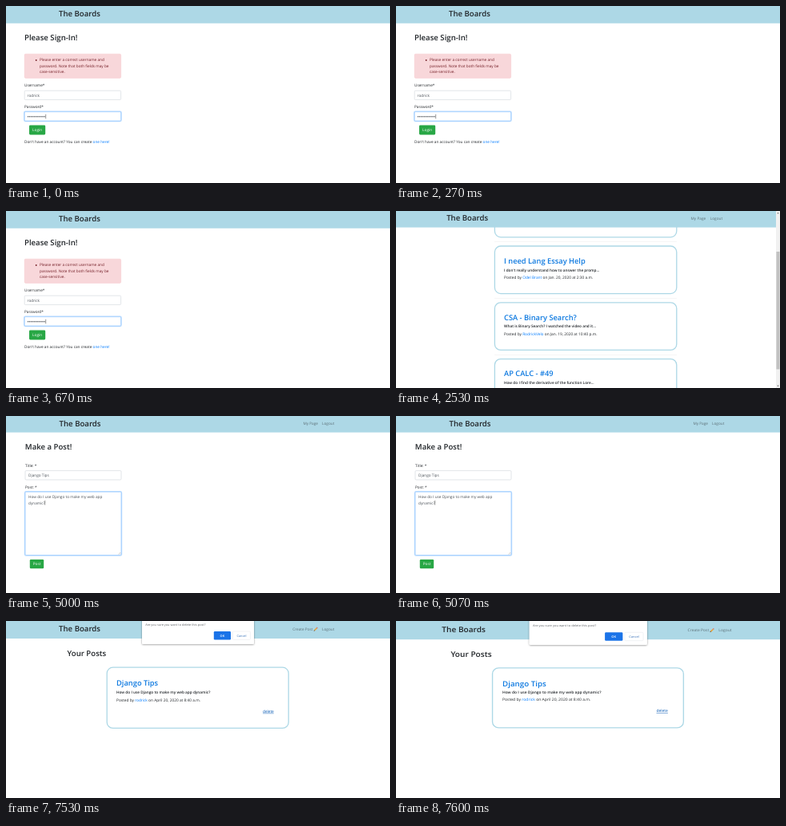
These frames come from a looping animation (480 by 222 pixels, 8000 ms). An HTML page:

```html
<!DOCTYPE html>
<html lang="en">
<head>
<meta charset="utf-8">
<title>The Boards</title>
<style>
html, body { margin: 0; width: 100%; height: 100%; overflow: hidden; background: #fff; }
svg { display: block; width: 100%; height: 100%; }
text { font-family: "Open Sans", "Noto Sans", sans-serif; text-rendering: geometricPrecision; white-space: pre; }
.link { fill: #007bff; }
</style>
</head>
<body>
<svg id="stage" viewBox="0 0 480 222" preserveAspectRatio="none"></svg>
<script>
const LOOP = 8000;
const INK = '#212529', BLUE = '#0f7ae0', SKY = '#add8e6', GREEN = '#28a745', MUTED = '#5d7178';
const SITE = 'The Boards', USER = 'rodrick';
const QUESTION = 'How do I use Django to make my web app';

const rect = (x, y, w, h, fill, more = '') =>
  `<rect x="${x}" y="${y}" width="${w}" height="${h}" fill="${fill}" ${more}/>`;
const text = (x, y, str, size = 4.74, fill = INK, weight = 400, more = '') =>
  `<text x="${x}" y="${y}" font-size="${size}" fill="${fill}" font-weight="${weight}" ${more}>${str}</text>`;
const link = str => `<tspan class="link">${str}</tspan>`;
const heading = (x, y, str) => text(x, y, str, 9.6, INK, 600);
const caret = (x, y) => rect(x, y, 0.5, 5.6, '#333');

const header = (h, x, y) => rect(-20, -10, 520, h + 10, SKY) + heading(x, y, SITE);

function field(x, y, w, h, focus) {
  const glow = focus
    ? rect(x - 0.6, y - 0.6, w + 1.2, h + 1.2, 'none', 'rx="1.6" stroke="#bfdeff" stroke-width="1.2"')
    : '';
  return glow + rect(x, y, w, h, '#fff', `rx="1.2" stroke="${focus ? '#80bdff' : '#ced4da'}" stroke-width=".6"`);
}

const button = (x, y, w, h, label) =>
  rect(x, y, w, h, GREEN, 'rx="1.3"') +
  text(x + w / 2, y + h / 2 + 1.8, label, 4.74, '#fff', 400, 'text-anchor="middle"');

const card = (x, y, w, h) =>
  rect(x, y, w, h, '#fff', `rx="7.5" stroke="${SKY}" stroke-width="1.3"`);

const post = (x, y, title, body, who, when) =>
  text(x, y, title, 9.3, BLUE, 600) +
  text(x, y + 9.7, body, 4.72, INK, 600) +
  text(x, y + 19.1, `Posted by ${link(who)} on ${when}`, 4.8);

function signIn() {
  let dots = '';
  for (let i = 0; i < 11; i++) dots += `<circle cx="${27.6 + i * 2.05}" cy="138.7" r=".75" fill="#495057"/>`;
  const alert = ['Please enter a correct username and', 'password. Note that both fields may be', 'case-sensitive.'];
  return header(21.7, 66, 13) + heading(23, 43, 'Please Sign-In!') +
    rect(23.2, 60.2, 120.4, 30.2, '#f8d7da', 'rx="1.3" stroke="#f5c6cb" stroke-width=".5"') +
    '<circle cx="37.7" cy="68" r=".9" fill="#721c24"/>' +
    alert.map((s, i) => text(42, 69.4 + i * 7.5, s, 4.74, '#721c24')).join('') +
    text(23, 100.8, 'Username*') + field(23.2, 106.2, 120.4, 11.4) + text(26.6, 113.6, USER, 4.74, '#495057') +
    text(23, 128, 'Password*') + field(23.2, 132.7, 120.4, 11.4, true) + dots + caret(49.6, 135.8) +
    button(29, 149.4, 20.2, 12, 'Login') +
    text(23, 172.2, `Don't have an account? You can create ${link('one here!')}`);
}

function feed() {
  const posts = [
    ['I need Lang Essay Help', "I don't really understand how to answer the promp...", 'Odel Brant', 'Jan. 20, 2020 at 2:30 a.m.'],
    ['CSA - Binary Search?', 'What is Binary Search? I watched the video and it...', 'RodrickVelo', 'Jan. 19, 2020 at 10:40 p.m.'],
    ['AP CALC - #49', 'How do I find the derivative of the function Lore...', USER, 'Jan. 18, 2020 at 9:15 p.m.']
  ];
  const step = 70.8;
  const item = (p, i) => rect(123, 38.4 + i * step, 228, 0.5, '#ececec') +
    card(123.4, 44 + i * step, 227.4, 59.6) + post(135, 65.8 + i * step, ...p);
  return card(123.4, 44 - step, 227.4, 59.6) + posts.map(item).join('') +
    header(20.6, 63.2, 12.2) +
    text(368.6, 11.2, 'My Page', 4.74, MUTED) + text(392.8, 11.2, 'Logout', 4.74, MUTED) +
    rect(475, 0, 5, 222, '#f1f1f1') + rect(475.4, 51, 4.2, 147.5, '#c1c1c1') +
    '<path d="M476.3 3.2l1.2-1.4 1.2 1.4zM476.3 218.8l1.2 1.4 1.2-1.4z" fill="#606060"/>';
}

function compose() {
  return header(20.6, 66.6, 12.5) +
    text(371.4, 11.4, 'My Page', 4.74, MUTED) + text(395, 11.4, 'Logout', 4.74, MUTED) +
    heading(23.8, 42, 'Make a Post!') +
    text(24, 64, 'Title: *') + field(24, 68.6, 120, 11.4) + text(28, 76.2, 'Django Tips', 4.74, '#495057') +
    text(24, 91, 'Post: *') + field(24, 95.2, 120, 79.3, true) +
    text(28, 102.8, QUESTION, 4.74, '#495057') + text(28, 110.6, 'dynamic?', 4.74, '#495057') + caret(48.6, 106) +
    '<path d="M140.6 173.6l2.6-2.6M142.2 173.6l1-1" stroke="#888" stroke-width=".4"/>' +
    button(29.8, 180, 17.4, 11.2, 'Post');
}

function remove(zoomed) {
  const pencil = '<g transform="translate(387.2 10.2) rotate(-45)">' +
    rect(-2.2, -0.8, 4, 1.6, '#e8a33a') + rect(1.8, -0.8, 1.2, 1.6, '#d9707a') +
    '<path d="M-2.2-.8L-3.6 0l1.4.8z" fill="#5a4632"/></g>';
  const dialog =
    rect(170, -12, 140, 41, '#fff', 'rx="1.5" filter="url(#shade)"') +
    text(174.2, 5.7, 'Are you sure you want to delete this post?', 3.86, '#5f6368') +
    rect(259.8, 13, 21.2, 10.5, '#1a73e8', 'rx="1.2"') +
    text(270.4, 19.6, 'OK', 3.9, '#fff', 600, 'text-anchor="middle"') +
    rect(283.4, 13, 22, 10.5, '#fff', 'rx="1.2" stroke="#e4e7eb" stroke-width=".5"') +
    text(294.4, 19.6, 'Cancel', 3.9, '#3a72b8', 400, 'text-anchor="middle"');
  const view = zoomed ? 'matrix(1.052 0 0 .985 -12.2 1.5)' : '';
  return `<g transform="${view}">` + header(22, 66.1, 12.7) +
    text(358.2, 11.7, 'Create Post', 4.74, MUTED) + pencil + text(395, 11.7, 'Logout', 4.74, MUTED) +
    heading(76.6, 44, 'Your Posts') + card(126.2, 58.2, 227, 76.2) +
    post(138, 81.4, 'Django Tips', QUESTION + ' dynamic?', USER, 'April 20, 2020 at 8:40 a.m.') +
    text(321, 114.7, 'delete', 4.74, '#0056b3', 400, 'text-decoration="underline"') +
    dialog + '</g>';
}

const scenes = [
  [0, signIn()],
  [2530, feed()],
  [5000, compose()],
  [7530, remove(false)],
  [7600, remove(true)]
];

const stage = document.getElementById('stage');
stage.innerHTML = '<defs><filter id="shade" x="-10%" y="-10%" width="120%" height="130%">' +
  '<feDropShadow dx="0" dy=".5" stdDeviation="1" flood-color="#000" flood-opacity=".45"/></filter></defs>' +
  scenes.map(([, body]) => `<g class="scene" visibility="hidden">${body}</g>`).join('');
const layers = [...stage.querySelectorAll('.scene')];

function draw(ms) {
  const now = scenes.findLastIndex(([from]) => ms >= from);
  layers.forEach((g, i) => g.setAttribute('visibility', i === now ? 'visible' : 'hidden'));
}

const start = performance.now();
function tick() {
  draw((performance.now() - start) % LOOP);
  requestAnimationFrame(tick);
}
tick();
</script>
</body>
</html>
```
